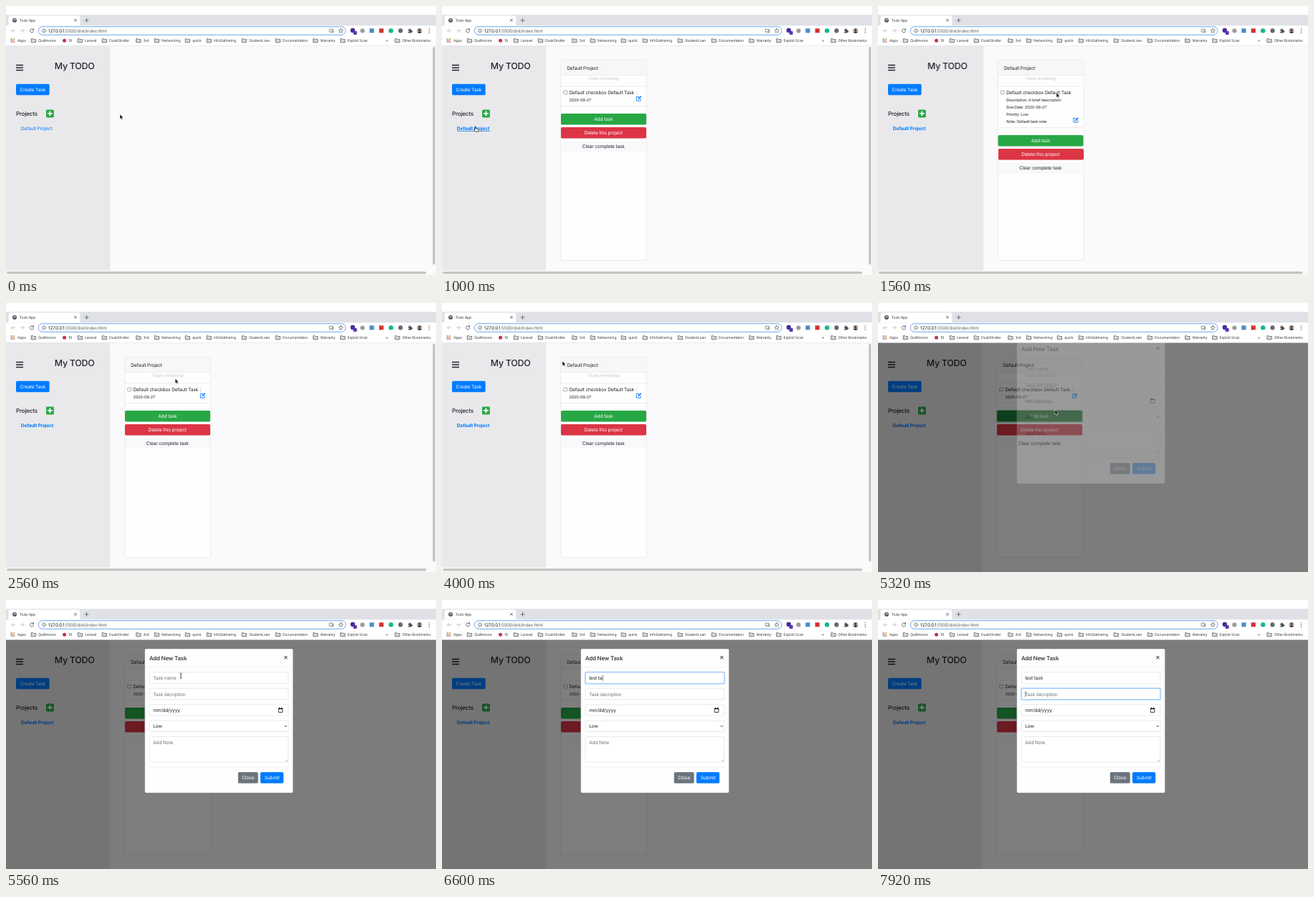
An HTML page that plays this animation: 600x375 px, repeating every 8 s.

```html
<!DOCTYPE html>
<html lang="en">
<head>
<meta charset="utf-8">
<title>Todo App</title>
<style>
html, body { margin: 0; width: 100%; height: 100%; overflow: hidden; background: #fff; }
svg { display: block; font: 6.6px Inter, "Liberation Sans", sans-serif; letter-spacing: -.025em; text-rendering: geometricPrecision; fill: #212529; }
.mid { text-anchor: middle; }
.white { fill: #fff; }
.blue { fill: #007bff; }
.bold { font-weight: 700; }
.small { font-size: 5.55px; }
.chrome { font-size: 5.15px; fill: #3c4043; }
.hint { fill: #6c757d; }
.line { fill: none; stroke: #5f6368; stroke-width: .9; stroke-linecap: round; stroke-linejoin: round; }
.field { fill: #fff; stroke: #ced4da; stroke-width: .5; }
.ring rect { fill: none; stroke: #bfdeff; stroke-width: 1.4; }
.ring rect + rect { stroke: #80bdff; stroke-width: .6; }

/* Hard switches */
.step { animation: 8s step-end infinite; }
#plain { animation-name: plain; }
#active, #panel { animation-name: panel; }
#under { animation-name: under; }
.open { animation-name: open; }
.shut { animation-name: shut; }
.shift { animation-name: shift; }
.below { animation-name: below; }
#title { animation-name: title; }
#scroll { animation-name: scroll; }
#hover { animation-name: hover; }
#focus { animation-name: focus; }
#arrow { animation-name: arrow; }
#hand { animation-name: hand; }
#beam { animation-name: beam; }
#hint1 { animation-name: hint1; }
#value { animation-name: value; }
#cover { animation-name: type; }
#caret1 { animation-name: type, caret1; }
#hint2 { animation-name: hint2; }
#value2 { animation-name: value2; }
#caret2 { animation-name: type2, caret2; }
@keyframes plain { 0% { opacity: 1 } 12% { opacity: 0 } }
@keyframes panel { 0% { opacity: 0 } 12% { opacity: 1 } }
@keyframes under { 0% { opacity: 0 } 10.75% { opacity: 1 } 17.25% { opacity: 0 } }
@keyframes open { 0%, 30.5% { opacity: 0 } 18.75% { opacity: 1 } }
@keyframes shut { 0%, 30.5% { opacity: 1 } 18.75% { opacity: 0 } }
@keyframes shift { 0%, 30.5% { transform: none } 18.75% { transform: translateX(1.5px) } }
@keyframes below { 0%, 30.5% { transform: none } 18.75% { transform: translate(1.5px, 30px) } }
@keyframes title { 0%, 30.5% { transform: none } 18.75% { transform: translateX(1.2px) } }
@keyframes scroll { 0% { opacity: 1 } 65.8% { opacity: 0 } }
@keyframes hover { 0%, 66.8% { opacity: 0 } 63% { opacity: 1 } }
@keyframes focus { 0%, 66.8% { opacity: 0 } 65% { opacity: 1 } }
@keyframes arrow { 0%, 17.25%, 66% { opacity: 1 } 10.75%, 63%, 68.8% { opacity: 0 } }
@keyframes hand { 0%, 17.25%, 66% { opacity: 0 } 10.75%, 63% { opacity: 1 } }
@keyframes beam { 0%, 76% { opacity: 0 } 68.8% { opacity: 1 } }
@keyframes hint1 { 0% { opacity: 1 } 76% { opacity: 0 } }
@keyframes value { 0% { opacity: 0 } 76% { opacity: 1 } }
@keyframes type {
  0% { transform: none }
  76% { transform: translateX(2.2px) }
  77% { transform: translateX(5.9px) }
  78% { transform: translateX(9.2px) }
  79% { transform: translateX(11.4px) }
  80% { transform: translateX(13.1px) }
  81% { transform: translateX(15.3px) }
  82% { transform: translateX(18.8px) }
  84% { transform: translateX(22.1px) }
  86.5% { transform: translateX(25.8px) }
}
@keyframes caret1 { 0%, 74%, 89.25% { opacity: 0 } 70.25%, 76% { opacity: 1 } }
@keyframes hint2 { 0%, 98.75% { opacity: 1 } 91% { opacity: 0 } }
@keyframes value2 { 0%, 98.75% { opacity: 0 } 91% { opacity: 1 } }
@keyframes type2 { 0%, 98.75% { transform: none } 91% { transform: translateX(2.4px) } }
@keyframes caret2 { 0%, 94.5% { opacity: 0 } 89.25%, 97.5% { opacity: 1 } }

/* Smooth motion */
#backdrop { animation: dim 8s linear infinite; }
#modal { animation: fade 8s linear infinite, drop 8s ease-out infinite; }
#ring1 { animation: ring1 8s linear infinite; }
#ring2 { animation: ring2 8s linear infinite; }
#cursor { animation: move 8s ease-in-out infinite; }
@keyframes dim { 0%, 65.55% { opacity: 0 } 66.3%, 100% { opacity: .5 } }
@keyframes fade { 0%, 66.3% { opacity: 0 } 67.25%, 100% { opacity: 1 } }
@keyframes drop { 0%, 66.3% { transform: translateY(-20.7px) } 68.2%, 100% { transform: none } }
@keyframes ring1 { 0%, 70% { opacity: 0 } 71%, 89% { opacity: 1 } 90%, 100% { opacity: 0 } }
@keyframes ring2 { 0%, 89% { opacity: 0 } 90%, 100% { opacity: 1 } }
@keyframes move {
  0%, 2% { transform: translate(159px, 151px) }
  4% { transform: translate(161px, 157px) }
  6%, 8.5% { transform: translate(143px, 167px) }
  11.5%, 16.5% { transform: translate(46px, 168px) }
  19.5%, 24% { transform: translate(249px, 121px) }
  27.5% { transform: translate(232px, 136px) }
  30% { transform: translate(222px, 114px) }
  34%, 36% { transform: translate(250px, 97px) }
  38.5% { transform: translate(202px, 99px) }
  41.5%, 43.5% { transform: translate(206px, 100px) }
  45.5%, 48.5% { transform: translate(299px, 98px) }
  50% { transform: translate(168px, 81px) }
  55% { transform: translate(143px, 112px) }
  58.5%, 59% { transform: translate(150px, 114px) }
  63.5% { transform: translate(222px, 156px) }
  65.5% { transform: translate(220px, 155px) }
  66.5% { transform: translate(247px, 149px) }
  69%, 70.25% { transform: translate(244px, 105.5px) }
  71.5%, 100% { transform: translate(301px, 211px) }
}
</style>
</head>
<body>
<svg width="600" height="375">
  <defs>
    <path id="folder" d="M.4.4h2.4l.8.9h3.2v4.2H.4z" fill="#d5d7da" stroke="#5f6368" stroke-width=".8" stroke-linejoin="round"/>
  </defs>

  <!-- Page -->
  <rect y="55" width="600" height="320" fill="#fafafc"/>
  <rect y="55" width="145.4" height="320" fill="#e9e9eb"/>
  <rect class="step open" y="55" width="147.2" height="320" fill="#e9e9eb"/>
  <path d="M14 82.5h10M14 86h10M14 89.5h10" stroke="#212529" stroke-width="1.5"/>
  <text id="title" class="step" x="67.8" y="88.4" style="font-size:12.4px;font-weight:500;letter-spacing:-.25px">My TODO</text>
  <rect class="blue" x="14" y="108.7" width="46.6" height="15.6" rx="1.7"/>
  <text class="white mid" x="37.3" y="118.9">Create Task</text>
  <text x="14" y="153" style="font-size:8px;font-weight:500">Projects</text>
  <rect x="56" y="144.4" width="10.8" height="11" rx="1.5" fill="#28a745"/>
  <path d="M58.1 149.9h6.6M61.4 146.6v6.6" stroke="#fff" stroke-width="1.7"/>
  <text id="plain" class="step blue" x="20.8" y="173.3">Default Project</text>
  <text id="active" class="step blue bold" x="20.8" y="173.3">Default Project</text>
  <rect id="under" class="step" x="21" y="174.4" width="46" height=".6" fill="#0056b3"/>

  <!-- Project card -->
  <g id="panel" class="step">
    <g class="step shift">
      <rect x="165.7" y="75.7" width="119.7" height="278.8" rx="1.7" fill="#fefefd" stroke="#dedee0" stroke-width=".6"/>
      <path d="M166 96.3v-18.6q0-1.7 1.7-1.7h115.7q1.7 0 1.7 1.7v18.6z" fill="#f7f7f7"/>
      <path d="M166 96.4h119M166 112h119" stroke="#dedee0" stroke-width=".6"/>
      <text x="174.2" y="88.5">Default Project</text>
      <text class="mid" x="225.4" y="103" fill="#c4c6c8" style="font-size:6px;font-style:italic">1 task remaining</text>
      <rect x="169.7" y="118.1" width="4.8" height="4.8" rx=".8" fill="#fff" stroke="#767676" stroke-width=".6"/>
      <text x="177.5" y="123">Default checkbox Default Task</text>
      <g class="step shut">
        <text x="270.8" y="123">:</text>
        <text class="small" x="177.5" y="133">2020-09-27</text>
      </g>
      <g class="step open small">
        <text x="177.5" y="133">Description: A brief description</text>
        <text x="177.5" y="143">Due Date: 2020-09-27</text>
        <text x="177.5" y="153">Priority: Low</text>
        <text x="177.5" y="163">Note: Default task note</text>
      </g>
    </g>
    <g class="step below">
      <g fill="none" stroke="#007bff" stroke-linecap="round" stroke-linejoin="round">
        <path d="M274.5 126.4h-3.2v5.8h5.8v-2.5" stroke-width=".9"/>
        <path d="M274.2 129.4l3-3" stroke-width="1.7"/>
      </g>
      <path d="M166 139.6h119" stroke="#dedee0" stroke-width=".6"/>
      <rect x="166" y="150" width="119" height="15.5" rx="1.7" fill="#28a745"/>
      <rect id="hover" class="step" x="166" y="150" width="119" height="15.5" rx="1.7" fill="#1e7e34"/>
      <rect id="focus" class="step" x="165.6" y="149.5" width="119.8" height="16.4" rx="2.1" fill="none" stroke="#94d3a2" stroke-width="1.2"/>
      <rect x="166" y="169" width="119" height="15.5" rx="1.7" fill="#dc3545"/>
      <rect x="166" y="188" width="119" height="15.6" rx="1.7" fill="#f8f9fb"/>
      <g class="mid">
        <text class="white" x="225.3" y="160.1">Add task</text>
        <text class="white" x="225.3" y="179.2">Delete this project</text>
        <text x="225.3" y="198.3">Clear complete task</text>
      </g>
    </g>
  </g>

  <g id="scroll" class="step">
    <rect y="368.8" width="600" height="6.2" fill="#fafafa"/>
    <g class="step shut">
      <rect x="594" y="55" width="6" height="320" fill="#fafafa"/>
      <rect x="595.5" y="57" width="3.2" height="303.5" rx="1.6" fill="#c1c1c1"/>
      <rect x="1" y="370.3" width="585.3" height="3.2" rx="1.6" fill="#c1c1c1"/>
    </g>
    <rect class="step open" x="1" y="370.3" width="591.5" height="3.2" rx="1.6" fill="#c1c1c1"/>
  </g>

  <rect id="backdrop" y="55" width="600" height="320" fill="#000"/>

  <!-- New task dialog -->
  <g id="modal">
    <rect x="193.6" y="67.9" width="207" height="201" rx="1.8" fill="#fefefe" stroke="#6d6d6d" stroke-width=".4"/>
    <path d="M194 93.4h206M200 233h194" stroke="#dee2e6" stroke-width=".5"/>
    <text x="199.9" y="83.5" style="font-size:7.9px;font-weight:500">Add New Task</text>
    <path d="M388.4 78.2l4 4m0-4l-4 4" stroke="#555" stroke-width="1.1"/>
    <g class="field">
      <rect x="200.2" y="101" width="193.6" height="15.3" rx="1.7"/>
      <rect x="200.2" y="123.4" width="193.6" height="15.3" rx="1.7"/>
      <rect x="200.2" y="145.8" width="193.6" height="15.3" rx="1.7"/>
      <rect x="200.2" y="168.2" width="193.6" height="15.3" rx="1.7"/>
      <rect x="200.2" y="190.6" width="193.6" height="35.4" rx="1.7"/>
    </g>
    <g id="ring1" class="ring">
      <rect x="199.5" y="100.3" width="195" height="16.7" rx="2.2"/>
      <rect x="200.2" y="101" width="193.6" height="15.3" rx="1.7"/>
    </g>
    <g id="ring2" class="ring">
      <rect x="199.5" y="122.7" width="195" height="16.7" rx="2.2"/>
      <rect x="200.2" y="123.4" width="193.6" height="15.3" rx="1.7"/>
    </g>
    <text id="hint1" class="step hint" x="205.2" y="111.1">Task name</text>
    <g id="value" class="step">
      <text x="205.2" y="111.1">test task</text>
      <rect id="cover" class="step" x="205.3" y="104" width="30" height="9.5" fill="#fff"/>
    </g>
    <rect id="caret1" class="step" x="205.3" y="104.3" width=".6" height="8.2"/>
    <text id="hint2" class="step hint" x="205.2" y="133.5">Task decription</text>
    <text id="value2" class="step" x="205.2" y="133.5">t</text>
    <rect id="caret2" class="step" x="205.5" y="126.9" width=".6" height="8.2"/>
    <text x="205.2" y="155.9">mm/dd/yyyy</text>
    <path d="M380.3 151.3h5.6v5.2h-5.6z" fill="none" stroke="#111" stroke-width=".8"/>
    <path d="M380 151.6h6.2M381.6 149.8v1.5M384.6 149.8v1.5" stroke="#111" stroke-width="1.1"/>
    <text x="205.2" y="178.3">Low</text>
    <path d="M388.7 175.2l1.5 1.6 1.5-1.6" fill="none" stroke="#222" stroke-width=".9"/>
    <text class="hint" x="205.2" y="201">Add Note</text>
    <path d="M390.2 225.2l2.9-2.9M391.9 225.2l1.2-1.2" stroke="#777" stroke-width=".5"/>
    <rect x="323.8" y="240" width="27.9" height="15.6" rx="1.7" fill="#6c757d"/>
    <rect class="blue" x="355" y="240" width="32.2" height="15.6" rx="1.7"/>
    <g class="mid white">
      <text x="337.7" y="250.2">Close</text>
      <text x="371.1" y="250.2">Submit</text>
    </g>
  </g>

  <!-- Browser bars -->
  <rect class="white" width="600" height="55.3"/>
  <rect y="12.3" width="600" height="15" fill="#dfe1e6"/>
  <path class="white" d="M1 27.3q2.6 0 2.6-2.6v-8.4q0-2.8 2.8-2.8h94q2.8 0 2.8 2.8v8.4q0 2.6 2.6 2.6z"/>
  <circle cx="12" cy="20" r="3" fill="#4d5156"/>
  <path d="M10 18.6l1.6.4.6 1.2-1 1.3M13 17.8l-.3 1 1.6.8" fill="none" stroke="#fff" stroke-width=".7"/>
  <text class="chrome" x="18.8" y="21.8">Todo App</text>
  <path class="line" d="M95.4 18.4l3 3m0-3l-3 3"/>
  <path class="line" d="M110 20h5M112.5 17.5v5"/>
  <path class="line" d="M12.6 34.4H7.6m2.2-2.3l-2.3 2.3 2.3 2.3M20.4 34.4h5m-2.2-2.3l2.3 2.3-2.3 2.3" style="stroke:#c3c5c8"/>
  <path class="line" d="M38.3 33a2.6 2.6 0 1 0 .3 2.2M38.5 31.5v1.8h-1.8"/>
  <rect x="45.3" y="28.8" width="428.6" height="11.5" rx="5.7" fill="#fff" stroke="#6fa5f0" stroke-width="1"/>
  <circle class="line" cx="53" cy="34.5" r="2.5" style="stroke-width:.7"/>
  <path class="line" d="M53 34.4v1.3M53 33.1v.1" style="stroke-width:.7"/>
  <text x="59" y="36.7" style="font-size:6.25px">127.0.0.1<tspan fill="#5f6368">:5500/dist/index.html</tspan></text>
  <path class="line" d="M455 36.3h-3.8v-4h5v1M455.4 34h1.6v2.6h-1.6z" style="stroke-width:.7"/>
  <path class="line" d="M467.2 31.4l.9 2 2.2.2-1.7 1.4.5 2.2-1.9-1.2-1.9 1.2.5-2.2-1.7-1.4 2.2-.2z" style="stroke-width:.7"/>
  <circle cx="483.8" cy="34" r="3.2" fill="#4a2a9c"/>
  <rect x="484.6" y="35" width="5" height="5" rx="1" fill="#5b35b5"/>
  <circle cx="497.4" cy="34.5" r="3.1" fill="#9a9c9f"/>
  <rect x="507.3" y="31.4" width="6.2" height="6" fill="#4b8bc8"/>
  <rect x="520.6" y="31.4" width="6.2" height="6" fill="#d23232"/>
  <circle cx="537.2" cy="34.4" r="3.2" fill="#14b886"/>
  <circle cx="550.5" cy="34.4" r="3.1" fill="#66696d"/>
  <path d="M561 33h1.6a1 1 0 1 1 1.8 0h1.5v1.5a1 1 0 1 1 0 1.8v1.3h-4.9v-1.5a1 1 0 1 0 0-1.7z" fill="#4d5156"/>
  <circle cx="577" cy="34.4" r="3.6" fill="#b9a9a6"/>
  <path d="M574.3 36.8q2.7-3 5.4 0-2.7 2.3-5.4 0z" fill="#3a2a2c"/>
  <circle cx="577" cy="33.4" r="1.4" fill="#3a2a2c"/>
  <path d="M590.5 31.6v.1M590.5 34.4v.1M590.5 37.2v.1" stroke="#4d5156" stroke-width="1.3" stroke-linecap="round"/>

  <g id="bookmarks" class="chrome">
    <circle cx="81.5" cy="48.2" r="2.5" fill="#c2354a"/>
    <text x="16" y="50.1">Apps</text>
    <text x="87.2" y="50.1">19</text>
    <text x="530" y="50.1">»</text>
  </g>
  <rect y="55" width="600" height=".5" fill="#dcdde0"/>

  <!-- Pointer -->
  <g id="cursor">
    <path id="arrow" class="step" d="M0 0v6.6l1.5-1.4 1 2.4 1.1-.5-1-2.3h2.1z" fill="#000" stroke="#fff" stroke-width=".5"/>
    <path id="hand" class="step" d="M.1.5q.7-.8 1.2 0v2.3l3 .7q.7.3.6 1l-.5 2.8H.8L-1.5 4.6q0-.9.8-.6l.8.7z" fill="#fff" stroke="#111" stroke-width=".7"/>
    <path id="beam" class="step" d="M-1.4-3.4Q0-3.4 0-2.4Q0-3.4 1.4-3.4M0-2.6v5.6M-1.4 3.8Q0 3.8 0 2.8Q0 3.8 1.4 3.8" fill="none" stroke="#222" stroke-width=".8"/>
  </g>
</svg>
<script>
const bar = document.getElementById("bookmarks");
const add = (tag, attrs, text = "") => {
  const el = document.createElementNS("http://www.w3.org/2000/svg", tag);
  for (const key in attrs) el.setAttribute(key, attrs[key]);
  el.textContent = text;
  bar.append(el);
};

const folders = {
  Quillmoore: 45, Laravel: 110, DuskStroller: 144, "3rd": 191.5, Networking: 217, quick: 260,
  InfoGathering: 290, StudentLoan: 339, Documentation: 386, Warranty: 438.5, "Exploit Scan": 476.5,
  "Other Bookmarks": 552.7
};
for (const [name, x] of Object.entries(folders)) {
  add("use", { href: "#folder", x: x - 10.2, y: 45.3 });
  add("text", { x, y: 50.1 }, name);
}

const dots = ["#d9483b", "#e8a33d", "#3f9b57", "#4a80d8"];
for (let i = 0; i < 9; i++) {
  add("rect", { x: 6.6 + i % 3 * 2.1, y: 45.3 + Math.floor(i / 3) * 2.1, width: 1.4, height: 1.4, fill: dots[i % 4] });
}
</script>
</body>
</html>
```
